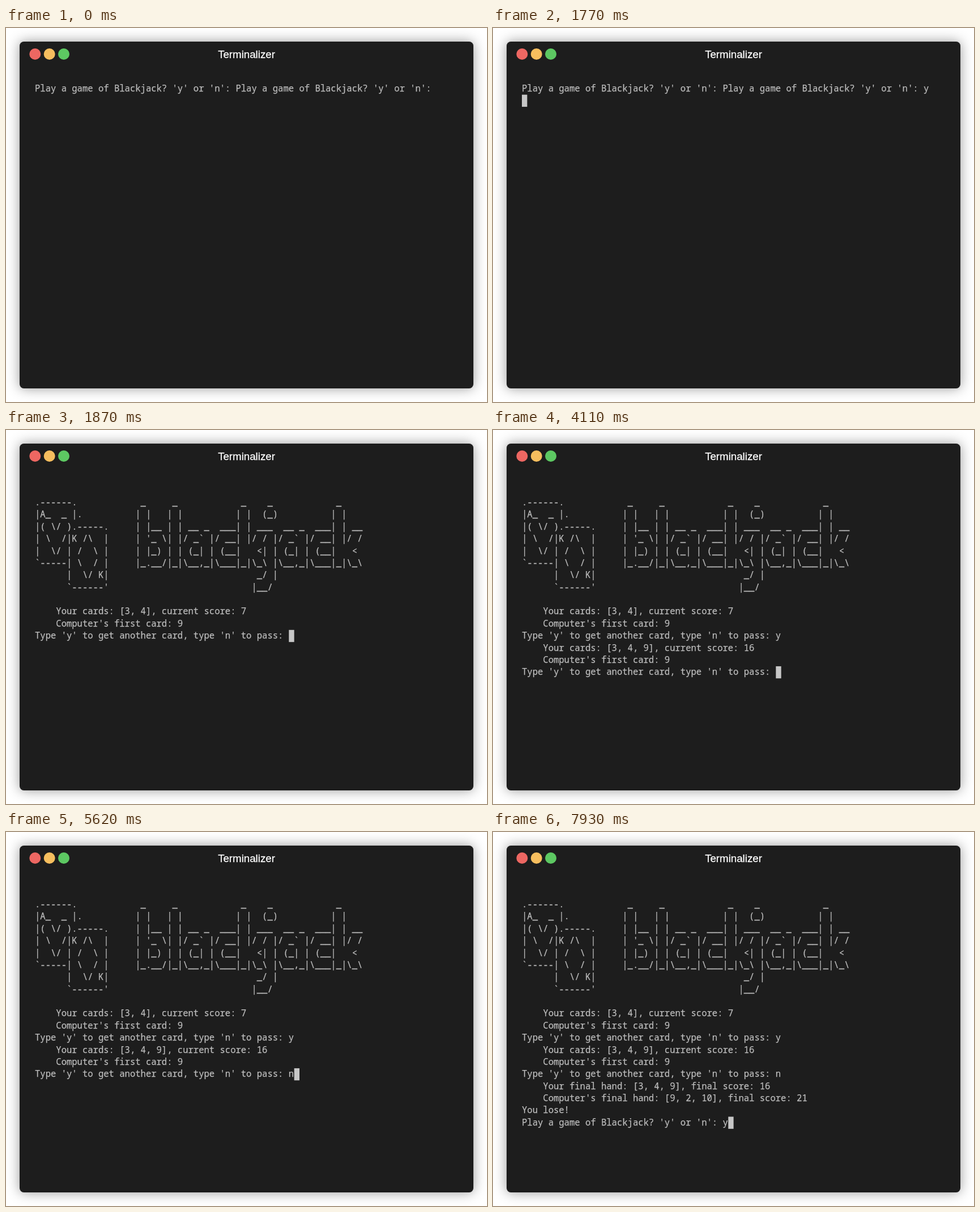
Recreate the animation shown at these times as an HTML page. Size 849 by 660 pixels, loop 8 s.

```html
<!DOCTYPE html>
<html lang="en">
<head>
<meta charset="utf-8">
<title>Blackjack terminal</title>
<style>
  html, body { margin: 0; width: 100%; height: 100%; overflow: hidden; background: #fff; }
  svg { display: block; width: 100%; height: 100%; }
  .window { fill: #1d1d1d; filter: drop-shadow(0 0 11px rgba(0, 0, 0, .4)); }
  .title {
    font: 18.7px "Liberation Sans", Arial, sans-serif;
    fill: #fff;
    stroke: #fff;
    stroke-width: .3px;
    text-anchor: middle;
  }
  #screen text {
    font: 15.567px "Noto Sans Mono", "DejaVu Sans Mono", monospace;
    font-variant-ligatures: none;
    white-space: pre;
    fill: #bdbdbd;
    stroke: #bdbdbd;
    stroke-width: .25px;
  }
  #cursor { fill: #c7c7c7; }
</style>
</head>
<body>
<svg viewBox="0 0 849 660">
  <rect class="window" x="24" y="24" width="801" height="612" rx="7.5"/>
  <circle cx="51.3" cy="46" r="10" fill="#ed6762"/>
  <circle cx="76.7" cy="46" r="10" fill="#f6be5e"/>
  <circle cx="102" cy="46" r="10" fill="#5dc862"/>
  <text class="title" x="424.5" y="52.5">Terminalizer</text>
  <rect id="cursor"/>
  <g id="screen"></g>
</svg>

<script type="text/plain" id="logo">
.------.            _     _            _    _            _
|A_  _ |.          | |   | |          | |  (_)          | |
|( \/ ).-----.     | |__ | | __ _  ___| | ___  __ _  ___| | __
| \  /|K /\  |     | '_ \| |/ _` |/ __| |/ / |/ _` |/ __| |/ /
|  \/ | /  \ |     | |_) | | (_| | (__|   <| | (_| | (__|   <
`-----| \  / |     |_.__/|_|\__,_|\___|_|\_\ |\__,_|\___|_|\_\
      |  \/ K|                            _/ |
      `------'                           |__/
</script>

<script>
const LOOP = 8000;
const LEFT = 51, TOP = 96.3, CELL_W = 9.34, CELL_H = 21.375, BASELINE = 15.4;

const screen = document.getElementById("screen");
const cursor = document.getElementById("cursor");
const logo = document.getElementById("logo").textContent;

const play = "Play a game of Blackjack? 'y' or 'n': ";
const ask = "Type 'y' to get another card, type 'n' to pass: ";
const turn = (cards, score) =>
  `    Your cards: [${cards}], current score: ${score}\n    Computer's first card: 9\n${ask}`;

const intro = play + play;
const first = logo + "\n" + turn("3, 4", 7);
const second = first + "y\n" + turn("3, 4, 9", 16);
const result = second + "n\n" +
  "    Your final hand: [3, 4, 9], final score: 16\n" +
  "    Computer's final hand: [9, 2, 10], final score: 21\n" +
  "You lose!\n" + play;

const steps = [
  { at: 0, text: intro, hideCursor: true },
  { at: 1450, text: intro + "y" },
  { at: 1770, text: intro + "y\n" },
  { at: 1870, text: first },
  { at: 3870, text: first + "y" },
  { at: 4110, text: second },
  { at: 5620, text: second + "n" },
  { at: 5990, text: result },
  { at: 7930, text: result + "y" },
];

function setAttrs(el, attrs) {
  for (const key in attrs) el.setAttribute(key, attrs[key]);
  return el;
}

function show({ text, hideCursor }) {
  const lines = text.split("\n");
  screen.replaceChildren(...lines.map((line, row) => {
    const el = document.createElementNS("http://www.w3.org/2000/svg", "text");
    el.textContent = line;
    return setAttrs(el, { x: LEFT, y: TOP + row * CELL_H + BASELINE });
  }));
  const row = lines.length - 1;
  setAttrs(cursor, {
    x: LEFT + lines[row].length * CELL_W,
    y: TOP + row * CELL_H,
    width: CELL_W,
    height: CELL_H,
    visibility: hideCursor ? "hidden" : "visible",
  });
}

let current;
function render(now) {
  const t = now % LOOP;
  const step = steps.findLast(s => s.at <= t);
  if (step !== current) show(current = step);
}

const start = performance.now();
function tick() {
  render(performance.now() - start);
  requestAnimationFrame(tick);
}
tick();
</script>
</body>
</html>
```
